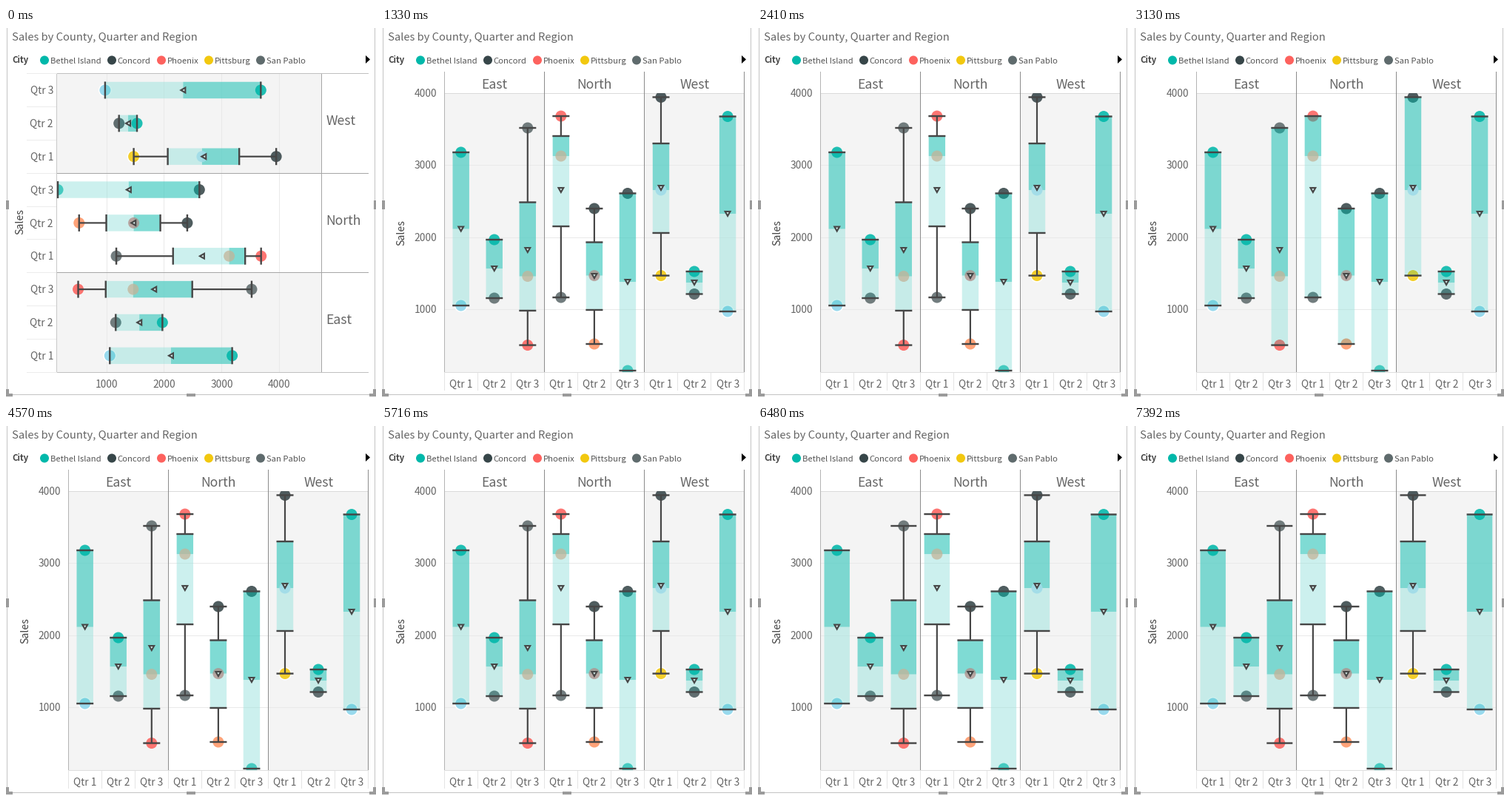
Animation of 500x500 px, one loop 8000 ms. Source, as a matplotlib script:

```python
import math

import matplotlib.pyplot as plt
from matplotlib.animation import FuncAnimation
from matplotlib.patches import Circle, Polygon, Rectangle

STEP, LOOP = 40, 8000
PX = 0.72  # points per pixel at 100 dpi

TEAL, DARK, RED, GOLD, GREY = "#01b8aa", "#374649", "#fd625e", "#f2c80f", "#5f6b6d"
SKY, ORANGE, INK, TEXT = "#8ad4eb", "#fe9666", "#464646", "#666666"
TAN = ("#c3b499", 0.75)

# min, q1, median, q3, max, mean, low dot, high dot, middle dot
DATA = {
    "East": [
        (1055, 1055, 2119, 3183, 3183, 2119, SKY, TEAL, None),
        (1158, 1158, 1569, 1970, 1970, 1569, GREY, TEAL, None),
        (505, 984, 1461, 2489, 3522, 1826, RED, GREY, TAN),
    ],
    "North": [
        (1168, 2155, 3131, 3409, 3686, 2659, GREY, RED, TAN),
        (521, 994, 1471, 1934, 2402, 1466, ORANGE, DARK, ("#b08c87", 0.75)),
        (151, 151, 1384, 2613, 2613, 1384, "#3fc9be", DARK, None),
    ],
    "West": [
        (1471, 2063, 2659, 3306, 3949, 2690, GOLD, DARK, ("#a0dce8", 0.9)),
        (1215, 1215, 1374, 1528, 1528, 1374, "#4b5a5d", TEAL, None),
        (973, 973, 2330, 3681, 3681, 2330, SKY, TEAL, None),
    ],
}

plt.rcParams["font.family"] = ["Noto Sans CJK JP", "DejaVu Sans"]
plt.rcParams["path.snap"] = False
fig = plt.figure(figsize=(5, 5), dpi=100, facecolor="white")
ax = fig.add_axes([0, 0, 1, 1])
ax.set(xlim=(0, 500), ylim=(500, 0))
ax.axis("off")


class Layer:
    """A set of artists that is shown or hidden together."""

    def __init__(self):
        self.items = []

    def keep(self, artist):
        artist.set_zorder(len(ax.get_children()))
        self.items.append(artist)
        return artist

    def patch(self, shape):
        return self.keep(ax.add_patch(shape))

    def rect(self, x0, y0, x1, y1, color, alpha=1):
        return self.patch(Rectangle((x0, y0), x1 - x0, y1 - y0, fc=color, lw=0, alpha=alpha))

    def line(self, x0, y0, x1, y1, color, width=1):
        return self.keep(ax.plot([x0, x1], [y0, y1], color=color, lw=width * PX,
                                 solid_capstyle="butt")[0])

    def dot(self, x, y, color, r=7.5, alpha=1):
        return self.patch(Circle((x, y), r, fc=color, lw=0, alpha=alpha))

    def text(self, x, y, s, size, color=TEXT, **kw):
        return self.keep(ax.text(x, y, s, fontsize=size * PX, color=color, **kw))

    def show(self, on):
        for item in self.items:
            item.set_visible(on)


def pos_rows(v):
    return 136 + (v - 1000) * 0.0777


def pos_cols(v):
    return 88.5 + (4000 - v) * 0.0973


def crisp(p):
    return math.floor(p) + 0.5


def draw_boxes(layer, flat, half=11.2, whiskers=True):
    """Draw all nine boxes; flat lays the value axis along x."""
    scale = pos_rows if flat else pos_cols
    if flat:
        clip = Rectangle((69, 62), 358, 403, transform=ax.transData)
    else:
        clip = Rectangle((85, 88), 405, 377, transform=ax.transData)

    def at(c, v):
        return (v, c) if flat else (c, v)

    def clipped(artist):
        artist.set_clip_path(clip)

    def dot(c, v, color, alpha=0.88, **kw):
        clipped(layer.dot(*at(c, v), color, alpha=alpha, **kw))

    def bar(c, a, b, color, alpha):
        (x0, y0), (x1, y1) = at(c - half, a), at(c + half, b)
        clipped(layer.rect(x0, y0, x1, y1, color, alpha))

    def cap(c, v):
        layer.line(*at(c - half - 0.3, v), *at(c + half + 0.3, v), INK, 2.4)

    def stem(c, a, b):
        layer.line(*at(c, a), *at(c, b), INK, 2.2)

    stats = [row for rows in DATA.values() for row in rows]
    for k, row in enumerate(stats):
        c = 84 + 44.85 * (8 - k) if flat else 106.7 + 45.05 * k
        lo, q1, med, q3, hi, mean = map(scale, row[:6])
        low, high, mid = row[6:]
        if not whiskers:
            q1, q3 = lo, hi
        bar(c, q1, q3, "white", 0.4)
        if low in (SKY, GOLD):
            dot(c, lo, "white", r=9, alpha=1)
        dot(c, lo, low)
        dot(c, hi, high)
        bar(c, q1, med, TEAL, 0.2)
        bar(c, med, q3, TEAL, 0.5)
        if mid:
            dot(c, med, mid[0], alpha=mid[1])
        if q1 != lo:
            stem(c, lo, q1)
            stem(c, q3, hi)
            cap(c, q1)
            cap(c, q3)
        cap(c, lo)
        cap(c, hi)
        tip, base = (-3, 3) if flat else (3, -3)
        corners = [at(c - 3.4, mean + base), at(c + 3.4, mean + base), at(c, mean + tip)]
        layer.patch(Polygon(corners, fc="#d5eeeb", ec=INK, lw=2.1 * PX, joinstyle="miter"))


def draw_frame():
    layer = Layer()
    edge, grip = "#c4c4c4", "#9b9b9b"
    layer.line(1.5, 0, 1.5, 496, edge)
    layer.line(498.5, 0, 498.5, 496, edge)
    layer.line(1, 495.5, 499, 495.5, edge)
    layer.rect(0, 233, 4, 245, grip)
    layer.rect(497, 233, 500, 245, grip)
    layer.rect(244, 494, 256, 498, grip)
    for x0, x1, a, b in ((0, 4, 0, 9), (496, 500, 491, 500)):
        layer.rect(x0, 488, x1, 498, grip)
        layer.rect(a, 494, b, 498, grip)
    layer.text(8, 17, "Sales by County, Quarter and Region", 14.8)
    layer.text(8, 47.5, "City", 11.4, "#444444", weight="bold")
    legend = (
        (52, "Bethel Island", TEAL),
        (143, "Concord", DARK),
        (210, "Phoenix", RED),
        (274, "Pittsburg", GOLD),
        (344, "San Pablo", GREY),
    )
    for x, name, color in legend:
        layer.dot(x, 43.5, color, r=6)
        layer.text(x + 7.5, 47.5, name, 11.3, "#555555")
    layer.patch(Polygon([(486, 37), (486, 48), (492, 42.5)], fc="black", lw=0))


def draw_rows():
    layer = Layer()
    for y in (62, 331):
        layer.rect(69, y, 427, y + 134, "#f4f4f4")
    for v in range(1000, 4001, 1000):
        x = crisp(pos_rows(v))
        layer.line(x, 62, x, 465, "#e9e9e9")
        layer.text(x, 486, str(v), 13.8, ha="center")
    for k in range(10):
        y = crisp(61.7 + 44.85 * k)
        layer.line(28, y, 69, y, "#ececec")
    layer.line(68.5, 62, 68.5, 465, "#c8c8c8")
    draw_boxes(layer, flat=True)
    for y, color in ((61.5, "#c0c0c0"), (196.5, "#a6a6a6"), (330.5, "#a6a6a6"), (465.5, "#c0c0c0")):
        layer.line(69, y, 490, y, color)
    layer.line(426.5, 62, 426.5, 465, "#a6a6a6")
    for k in range(9):
        layer.text(64, 89 + 44.85 * k, f"Qtr {3 - k % 3}", 13.8, ha="right")
    for k, name in enumerate(("West", "North", "East")):
        layer.text(432.5, 131 + 134.5 * k, name, 17.7)
    layer.text(26, 262, "Sales", 14.2, "#444444", rotation=90, ha="right", va="center")
    return layer


def draw_cols(**style):
    layer = Layer()
    for x in (85, 355):
        layer.rect(x, 88, x + 134.5, 465, "#f4f4f4")
    for v in range(1000, 4001, 1000):
        y = crisp(pos_cols(v))
        layer.line(85, y, 490, y, "#e9e9e9")
        layer.text(74, y + 4.8, str(v), 13.8, ha="right")
    for k in range(10):
        x = 84.5 + 45 * k
        layer.line(x, 465, x, 490, "#e4e4e4")
    layer.line(85, 88.5, 490, 88.5, "#dadada")
    layer.line(85, 465.5, 490, 465.5, "#dedede")
    draw_boxes(layer, flat=False, **style)
    for x, color in ((84.5, "#b4b4b4"), (219.5, "#8c8c8c"), (354.5, "#8c8c8c"), (489.5, "#8c8c8c")):
        layer.line(x, 59, x, 465, color)
    for k in range(9):
        layer.text(106.5 + 45.1 * k, 486, f"Qtr {k % 3 + 1}", 13.7, ha="center")
    for k, name in enumerate(DATA):
        layer.text(151.7 + 135.3 * k, 82, name, 17.7, ha="center")
    layer.text(33, 277, "Sales", 14.2, "#444444", rotation=90, ha="right", va="center")
    return layer


draw_frame()
rows = draw_rows()
quartiles = draw_cols()
full_range = draw_cols(whiskers=False)
wide = draw_cols(half=17.2)
layers = (rows, quartiles, full_range, wide)
schedule = ((0, rows), (1330, quartiles), (3130, full_range), (4570, quartiles), (6480, wide))


def update(i):
    mid = i * STEP + STEP / 2
    current = [layer for start, layer in schedule if start <= mid][-1]
    for layer in layers:
        layer.show(layer is current)
    return []


anim = FuncAnimation(fig, update, frames=LOOP // STEP, interval=STEP,
                     init_func=lambda: update(0), repeat=True, repeat_delay=0, blit=False)
plt.show()
```
